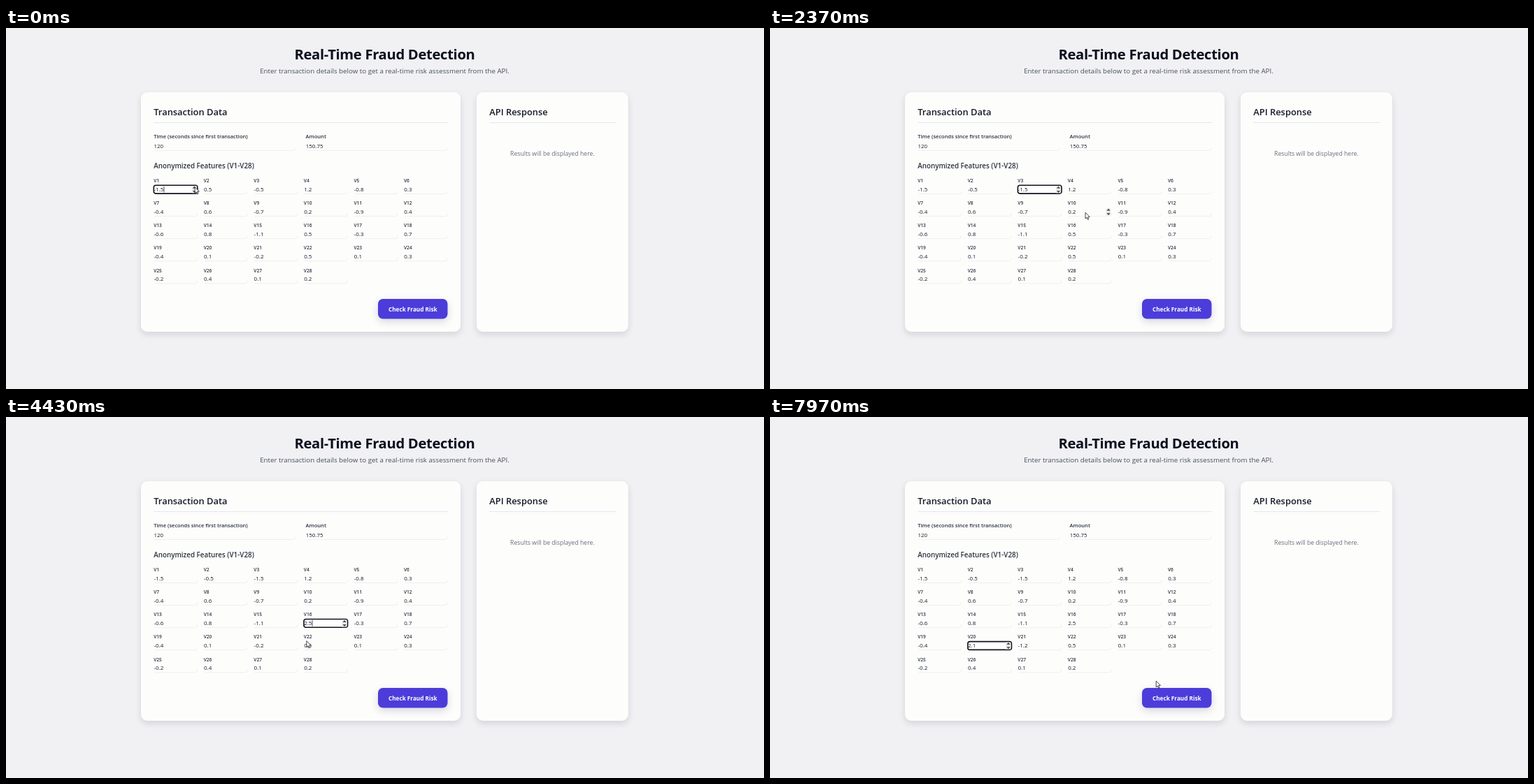
An HTML page with a canvas that plays this animation: 1084 px wide and 517 px high, repeating every 8000 ms.

```html
<!DOCTYPE html>
<html lang="en">
<head>
<meta charset="utf-8">
<title>Fraud check form</title>
<style>
  html, body { margin: 0; width: 100%; height: 100%; overflow: hidden; background: #f1f1f4; }
  canvas { display: block; width: 1084px; height: 517px; }
</style>
</head>
<body>
<canvas id="stage"></canvas>
<script>
const W = 1084, H = 517, LOOP = 8000, BLINK = 530;
const canvas = document.getElementById('stage');
const ctx = canvas.getContext('2d');
const dpr = window.devicePixelRatio || 1;
canvas.width = W * dpr;
canvas.height = H * dpr;

const FAMILY = '"Open Sans", "Noto Sans", sans-serif';
const INK = '#141a28', SOFT_INK = '#2b3240';
const START = ('-1.5 0.5 -0.5 1.2 -0.8 0.3 -0.4 0.6 -0.7 0.2 -0.9 0.4 -0.6 0.8 ' +
  '-1.1 0.5 -0.3 0.7 -0.4 0.1 -0.2 0.5 0.1 0.3 -0.2 0.4 0.1 0.2').split(' ');

// The pointer rests on a field's spinner between "from" and "to", clicking it there.
const VISITS = [
  { field: 1, step: 1, clicks: 0, from: 0, to: 250 },
  { field: 2, step: -1, clicks: 1, from: 620, to: 950 },
  { field: 3, step: -1, clicks: 1, from: 1400, to: 1800 },
  { field: 16, step: 1, clicks: 2, from: 2900, to: 4060 },
  { field: 21, step: -1, clicks: 1, from: 4600, to: 5300, blur: 5650 },
  { field: 20, step: 1, clicks: 2, from: 6600, to: 7350 }
];
const EXIT = { x: 553, y: 378, from: LOOP };

const fieldPos = n => ({
  x: 211.2 + ((n - 1) % 6) * 71.55,
  y: 224.8 + Math.floor((n - 1) / 6) * 32.1
});

function restPoint(stop) {
  if (!stop.field) return stop;
  const { x, y } = fieldPos(stop.field);
  return { x: x + 58.5, y: y + (stop.step > 0 ? 2.6 : 8) };
}

function pointerAt(t) {
  const i = VISITS.findLastIndex(v => t >= v.from);
  const next = VISITS[i + 1] || EXIT;
  const a = restPoint(VISITS[i]), b = restPoint(next);
  const u = Math.max(0, (t - VISITS[i].to) / (next.from - VISITS[i].to));
  const ease = u * u * (3 - 2 * u);
  return { x: a.x + (b.x - a.x) * ease, y: a.y + (b.y - a.y) * ease };
}

function stateAt(t) {
  const values = START.slice();
  let focus = 1, since = 0;
  for (const { field, step, clicks, from, to, blur } of VISITS) {
    for (let k = 0; k < clicks; k++) {
      const time = from + (to - from) * (k + 0.75) / clicks;
      if (time > t) break;
      values[field - 1] = (Number(values[field - 1]) + step).toFixed(1);
      focus = field;
      since = time;
    }
    if (t >= blur) focus = 0;
  }
  return { values, focus, caret: Math.floor((t - since) / BLINK) % 2 === 0 };
}

function text(str, x, y, size, color, weight = 400, align = 'left', spacing = 0) {
  ctx.font = `${weight} ${size}px ${FAMILY}`;
  ctx.letterSpacing = spacing + 'px';
  ctx.textAlign = align;
  ctx.fillStyle = color;
  ctx.fillText(str, x, y);
}

function roundBox(x, y, w, h, r) {
  ctx.beginPath();
  ctx.roundRect(x, y, w, h, r);
}

function panel(x, y, w, h, r, fill, shadow, blur, drop) {
  ctx.save();
  ctx.shadowColor = shadow;
  ctx.shadowBlur = blur * dpr;
  ctx.shadowOffsetY = drop * dpr;
  ctx.fillStyle = fill;
  roundBox(x, y, w, h, r);
  ctx.fill();
  ctx.restore();
}

function heading(str, x, w) {
  text(str, x, 124.6, 12.9, INK, 600);
  ctx.fillStyle = '#e4e5f2';
  ctx.fillRect(x, 135, w, 1);
}

function fieldEdge(x, bottom, w) {
  ctx.strokeStyle = '#efefee';
  ctx.lineWidth = 1;
  ctx.beginPath();
  ctx.moveTo(x + 1, bottom);
  ctx.lineTo(x + w - 3, bottom);
  ctx.quadraticCurveTo(x + w, bottom, x + w, bottom - 4);
  ctx.stroke();
}

function wideField(label, value, x, w) {
  text(label, x, 158.2, 7.53, SOFT_INK, 600);
  text(value, x + 0.2, 172.1, 7.9, INK);
  fieldEdge(x, 175.5, w);
}

function triangle(x, y, dir) {
  ctx.beginPath();
  ctx.moveTo(x - 2.6, y);
  ctx.lineTo(x + 2.6, y);
  ctx.lineTo(x, y + 3.2 * dir);
  ctx.fill();
}

function spinner(x, y) {
  ctx.fillStyle = '#ececec';
  ctx.fillRect(x + 54.5, y + 1.5, 7, 10);
  ctx.fillStyle = '#505050';
  triangle(x + 58.2, y + 4.9, -1);
  triangle(x + 58.2, y + 8.1, 1);
}

function feature(n, value, focused, caret, mouse) {
  const { x, y } = fieldPos(n);
  const hover = mouse.x > x && mouse.x < x + 63 && mouse.y > y && mouse.y < y + 12.8;
  text('V' + n, x, y - 3.7, 6.6, SOFT_INK, 600);
  if (focused) {
    ctx.fillStyle = '#fff';
    ctx.strokeStyle = '#10121c';
    ctx.lineWidth = 1.6;
    roundBox(x + 0.1, y + 0.5, 62.6, 11.8, 3);
    ctx.fill();
    ctx.stroke();
  } else {
    fieldEdge(x, y + 12.7, 62.5);
  }
  text(value, x + 0.3, y + 9.2, 8, INK);
  if (focused && caret) {
    const end = x + 0.5 + ctx.measureText(value).width;
    ctx.fillStyle = '#222';
    ctx.fillRect(end, y + 2, 0.8, 8.6);
  }
  if (focused || hover) spinner(x, y);
}

function pointer({ x, y }) {
  ctx.save();
  ctx.translate(x, y);
  ctx.fillStyle = '#fff';
  ctx.strokeStyle = '#24242c';
  ctx.lineWidth = 0.85;
  const arrow = new Path2D('M.4 .3V9.2L2.4 7.4 3.8 10.6 5.2 10 3.9 6.9 6.6 6.7Z');
  ctx.fill(arrow);
  ctx.stroke(arrow);
  ctx.restore();
}

function draw(t) {
  const { values, focus, caret } = stateAt(t);
  const mouse = pointerAt(t);
  ctx.setTransform(dpr, 0, 0, dpr, 0, 0);
  ctx.fillStyle = '#f1f1f4';
  ctx.fillRect(0, 0, W, H);

  text('Real-Time Fraud Detection', 541.5, 45.2, 20.2, '#0b0f1e', 700, 'center', -0.32);
  text('Enter transaction details below to get a real-time risk assessment from the API.',
    541.5, 64.8, 9.76, '#475056', 400, 'center');

  for (const [x, w] of [[193, 457], [673, 216.8]]) {
    panel(x, 92, w, 343, 9, '#fdfdfc', 'rgba(20,20,40,0.13)', 10, 4);
  }

  heading('Transaction Data', 211.2, 420.5);
  heading('API Response', 691.2, 181);
  text('Results will be displayed here.', 781.4, 183, 8.67, '#686f7b', 400, 'center');

  wideField('Time (seconds since first transaction)', '120', 211.2, 203);
  wideField('Amount', '150.75', 428.6, 202.5);

  text('Anonymized Features (V1-V28)', 211.2, 200.6, 9.84, SOFT_INK, 600);
  values.forEach((v, i) => feature(i + 1, v, focus === i + 1, caret, mouse));

  panel(532, 388, 99.5, 28.6, 7, '#4c3cda', 'rgba(30,25,80,0.17)', 11, 4);
  text('Check Fraud Risk', 581.8, 405.8, 8.2, '#fff', 700, 'center');
  pointer(mouse);
}

const begin = performance.now();
function tick() {
  draw((performance.now() - begin) % LOOP);
  requestAnimationFrame(tick);
}
tick();
</script>
</body>
</html>
```
